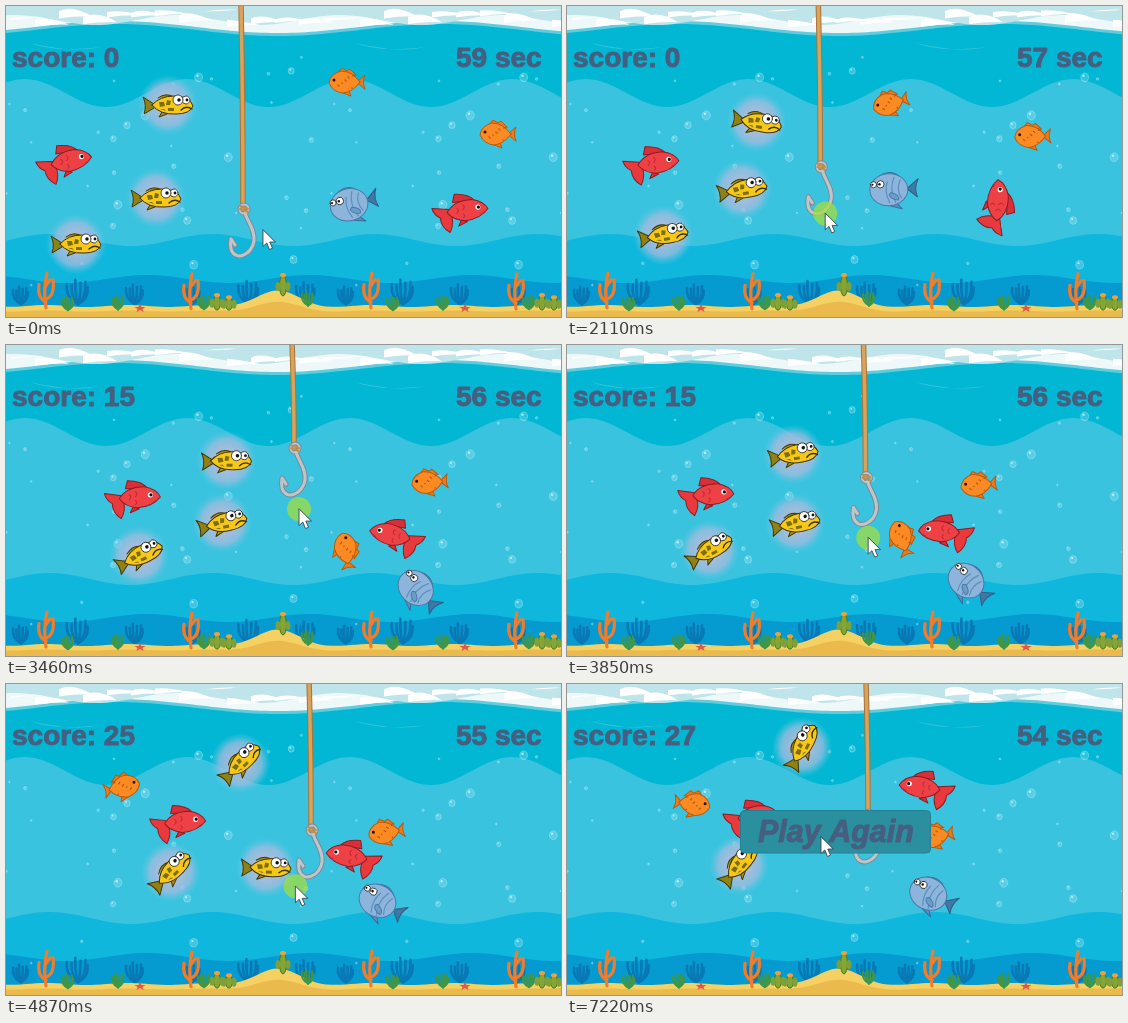
An HTML page with a canvas that plays this animation: 555x311 px, repeating every 7.31 s.

```html
<!DOCTYPE html>
<html>
<head>
<meta charset="utf-8">
<style>
html, body { margin: 0; width: 100%; height: 100%; overflow: hidden; }
canvas { display: block; }
</style>
</head>
<body>
<canvas id="stage" width="555" height="311"></canvas>
<script>
const W = 555, H = 311, LOOP = 7310, TILE = 325;
const START = 1270, GAME_OVER = 5250, HOVER = 5980, PRESS = 7140;
const INK = '#465f80';
const scenery = document.createElement('canvas');
scenery.width = W;
scenery.height = H;
let g = scenery.getContext('2d');

let seed = 7;
function random(low, high) {
  seed = seed * 16807 % 2147483647;
  return low + (high - low) * seed / 2147483647;
}
const clamp = p => Math.max(0, Math.min(1, p));
const mix = (a, b, p) => a + (b - a) * p;

function shape(d, fill, stroke, width = 1) {
  const path = new Path2D(d);
  if (fill) { g.fillStyle = fill; g.fill(path); }
  if (stroke) {
    g.strokeStyle = stroke;
    g.lineWidth = width;
    g.lineCap = g.lineJoin = 'round';
    g.stroke(path);
  }
}

function oval(x, y, rx, ry, fill, stroke, width = 1) {
  g.beginPath();
  g.ellipse(x, y, rx, ry, 0, 0, 7);
  if (fill) { g.fillStyle = fill; g.fill(); }
  if (stroke) { g.strokeStyle = stroke; g.lineWidth = width; g.stroke(); }
}

// ---- scenery: a tile that repeats every 325 px ----

const turn = x => x * 2 * Math.PI / TILE;
// Edge with a number of crests per tile, lowest on screen at x = trough.
const swell = (base, height, crests, trough) =>
  x => base + height * Math.cos(crests * turn(x - trough));
const dunes = x => 300 + Math.cos(turn(4 * x)) - 15 * Math.max(0, Math.cos(turn(x - 270))) ** 6;

// Fills everything below the edge, or above it if up.
function layer(edge, fill, up) {
  let d = `M0 ${up ? 0 : H}`;
  for (let x = 0; x <= W + 5; x += 5) d += `L${x} ${edge(x)}`;
  shape(`${d}V${up ? 0 : H}Z`, fill);
}

// Fan of curved stalks growing from one base.
function plant(x, y, height, stalks, color, width = 2) {
  for (let i = 0; i < stalks; i++) {
    const a = 1.4 * i / (stalks - 1) - .7;
    const h = height * (1 - .3 * Math.abs(a) - .12 * (i % 2));
    shape(`M${x} ${y}q${h * a * .9} ${-h * .3} ${h * a * .8} ${-h}`, null, color, width);
  }
}

function coral(x, height) {
  const y = dunes(x) + 3;
  shape(`M${x} ${y}q-3 ${-height / 2} 1 ${-height}M${x} ${y - 6}q-9 -4 -7 ${-height * .5}` +
        `M${x} ${y - 9}q9 -3 7 ${-height * .55}M${x - 1} ${y - height * .6}l5 -7`, null, '#f07c2c', 3.2);
}

function cactus(x, height) {
  const y = dunes(x) + 5;
  oval(x, y - height / 2, 3.5, height / 2, '#86a535', '#47791f');
  for (const side of [-5, 5]) oval(x + side, y - height * .45, 2.5, 4.5, '#7da03a');
  oval(x, y - height, 3, 2, '#f0a03a');
}

function reef() {
  for (let x = 15; x < TILE; x += 57) plant(x, 298, random(18, 26), 6, '#0879b5', 2.6);
}

function seabed() {
  coral(40, 35);
  coral(185, 35);
  for (const x of [62, 112, 198, 302]) plant(x, dunes(x) + 4, 14, 6, '#3f9648');
  cactus(211, 15);
  cactus(223, 13);
  cactus(277, 21);
  shape('M134 298l1.500 3 4 0-3 2 1 3-3.500-2-3.500 2 1-3-3-2 4 0z', '#e2574a');
}

function bubbles() {
  for (let i = 0; i < 34; i++) {
    const x = random(0, TILE), y = random(38, 280), r = .8 + 4 * random(0, 1) ** 3;
    oval(x, y, r, r * 1.1, 'rgba(190,240,250,.25)', 'rgba(200,243,252,.5)', .7);
    oval(x - r * .3, y - r * .4, r * .3, r * .3, 'rgba(255,255,255,.6)');
  }
}

function foam() {
  for (let x = 5; x < TILE; x += 24) {
    const y = random(4, 15);
    shape(`M${x} ${y}q${random(8, 16)} ${random(-7, 1)} 34 ${random(-2, 6)}q-14 -1 -34 2z`, '#fff');
  }
}

function tiled(draw) {
  const start = seed;
  for (let x = 0; x < W; x += TILE) {
    seed = start;
    g.save();
    g.translate(x, 0);
    draw();
    g.restore();
  }
}

function paintScenery() {
  g.fillStyle = '#02b7d3';
  g.fillRect(0, 0, W, H);
  tiled(() => shape('M22 36Q45 47 95 41Q72 46 45 41Q30 39 22 36Z', '#35c6dc'));
  layer(swell(87, 14, 2, 100), '#39c3df');
  layer(swell(234, 6, 2, 125), '#10b7dd');
  layer(swell(273, 4, 2, 60), '#069bd0');
  tiled(reef);
  tiled(bubbles);
  layer(dunes, '#f5d163');
  layer(x => dunes(x) * .6 + 125, '#eabb4c');
  tiled(seabed);
  layer(swell(24, 6, 1, 272), '#62cbdc', true);
  layer(swell(21, 6, 1, 272), '#eef8f9', true);
  layer(swell(14, 5, 2, 90), '#bfe4e9', true);
  tiled(foam);
}

// ---- fish, drawn facing right around their centre ----

function eye(x, y, r) {
  oval(x, y, r, r, '#fff', '#222', .8);
  oval(x + 1, y, r * .35, r * .35, '#111');
}

const art = {
  yellow() {
    const light = g.createRadialGradient(0, 0, 4, 0, 0, 30);
    light.addColorStop(0, 'rgba(205,188,218,.9)');
    light.addColorStop(.65, 'rgba(160,188,222,.75)');
    light.addColorStop(1, 'rgba(100,200,226,0)');
    oval(0, 0, 30, 30, light);
    shape('M-14-1L-25-8Q-21 0-24 9L-14 3Z', '#8f8212', '#3d3808');
    shape('M-10-7Q-2-13 6-8M-6 7l-3 5 8-3', '#a5901a', '#3d3808');
    shape('M-16 0Q-8-9 6-9Q22-9 25 1Q22 9 8 9Q-8 10-16 0Z', '#f7c916', '#3d3208');
    shape('M-9-3l5 0 1 4-5 1ZM-1-5l4 1-1 4-4 0ZM0 3l6 0 0 3-6 0ZM-8 4l4 0 2 2z', '#7d6d10');
    eye(18, -5, 4);
    eye(10, -5, 5);
    shape('M13 5Q18 0 24 4', null, '#3d3208', 1.4);
  },
  red() {
    const edge = '#8c1c24';
    shape('M-11-2L-28-4Q-26 3-20 6Q-20 15-11 21Q-6 12-9 3Z', '#e8393c', edge);
    shape('M-7-9L-5-17Q9-17 15-10ZM1 9l-3 6 9-4z', '#d92f37', edge);
    shape('M-13 1Q-6-11 12-11Q24-9 28-1Q20 9 5 10Q-7 9-13 1Z', '#ee4145', edge);
    shape('M-3-3q3 2 0 5M3-6q3 2 0 5M3 3q3 2 0 4M21 4l4-2', null, '#bd2934');
    oval(18, -3, 2.6, 2.6, '#fff');
    oval(18.6, -3, 1.6, 1.6, '#111');
  },
  blue() {
    shape('M-15 0L-27-9Q-22 0-25 9Z', '#3f78a4', '#2f5f88');
    shape('M-9-12Q0-21 12-14ZM-4 14l-5 6 12-4z', '#5b8fbe', '#3a6c98');
    oval(3, 0, 19, 16, '#8db5db', '#4a7ba8');
    shape('M-9-9q5 9 0 18M-3-12q6 12 0 25M4-8q4 10-1 21', null, '#5d8fbd', 1.2);
    shape('M1 3q-9 3-7 8q8-1 9-6z', '#6b9dcb', '#4a7ba8');
    eye(18, -6, 3);
    eye(11, -6, 3.6);
  },
  orange() {
    const edge = '#b95b0e';
    shape('M-10 0L-18-7Q-15 0-18 7Z', '#ee7a1b', edge);
    shape('M-9-7L-3-13 0-11 5-14 10-8ZM-2 9l-2 5 8-3z', '#ee7a1b', edge);
    shape('M-13 0Q-5-11 6-11Q17-8 18 1Q14 10 4 11Q-6 10-13 0Z', '#fb8a22', edge);
    for (let i = 0; i < 9; i++) oval(-6 + i * 7 % 17, -6 + i * 5 % 13, .7, .7, '#ae4d0d');
    oval(13, -2, 1.5, 1.5, '#301505');
  }
};

// ---- motion ----

// A swim passes through [x, y, heading] at its start, halfway (optional) and end.
// A caught fish scores and leaves; its next swim starts somewhere else.
const caught = (until, points, ...path) => ({ until, points, path });
const free = (...path) => ({ until: GAME_OVER, path });

const school = [
  ['yellow', free([162, 99, 0], [217, 118, 3], [235, 63, -62])],
  ['yellow', caught(GAME_OVER, 0, [150, 192, 0], [210, 178, -13], [272, 187, 8])],
  ['yellow', free([70, 238, 0], [128, 214, -23], [172, 181, -50])],
  ['red', free([58, 156, -8], [120, 154, 0], [184, 133, -2])],
  ['red', caught(5060, 2, [454, 205, -3], [400, 194, -160], [342, 170, -168]),
    free([366, 106, -176], [360, 104, -176])],
  ['orange', caught(3080, 10, [341, 76, 180], [304, 122, 145]),
    caught(3900, 10, [345, 218, -90], [334, 192, -110]),
    free([88, 106, -35], [108, 97, -25], [125, 120, 8])],
  ['orange', free([492, 128, 180], [430, 136, 176], [369, 152, 170])],
  ['blue', caught(2780, 5, [346, 198, 165], [308, 172, 185]),
    free([430, 258, 232], [364, 211, 205])]
];

function along(path, p) {
  const a = path[0], b = path[path.length - 1];
  const middle = path.length > 2 ? path[1] : a.map((v, i) => (v + b[i]) / 2);
  return a.map((v, i) => mix(v, b[i], p) + 4 * p * (1 - p) * (middle[i] - (v + b[i]) / 2));
}

// Key points are [time, x, y].
const hookPath = [[START, 238, 203], [1570, 242, 178], [2670, 267, 143],
  [3460, 289, 103], [4320, 312, 168], [GAME_OVER, 302, 131]];
const pointerPath = [[0, 257, 224], [240, 250, 226], [1570, 242, 231], [2670, 275, 183],
  [3460, 293, 164], [4320, 311, 227], [5570, 262, 171], [6300, 255, 168], [6600, 254, 153]];

function at(keys, t) {
  const next = keys.findIndex(k => k[0] > t);
  if (next < 1) return keys[next ? keys.length - 1 : 0].slice(1);
  const a = keys[next - 1], b = keys[next], p = (t - a[0]) / (b[0] - a[0]);
  return [mix(a[1], b[1], p), mix(a[2], b[2], p)];
}

function label(text, x, y, font) {
  g.font = font + ' "Liberation Sans", sans-serif';
  g.fillStyle = g.strokeStyle = INK;
  g.lineWidth = 1;
  g.lineJoin = 'round';
  g.fillText(text, x, y);
  g.strokeText(text, x, y);
}

function drawFish(kind, swims, t) {
  const i = swims.findIndex(s => t < s.until || s.points === undefined);
  if (i < 0) return;
  const begin = i ? swims[i - 1].until : START;
  const p = clamp((t - begin) / (swims[i].until - begin));
  const [x, y, heading] = along(swims[i].path, p), angle = heading * Math.PI / 180;
  g.save();
  g.translate(x, y);
  g.rotate(angle);
  if (Math.cos(angle) < 0) g.scale(1, -1);
  art[kind]();
  g.restore();
}

function drawHook(t) {
  const [x, y] = at(hookPath, t);
  const rope = `M${x - 3} -3Q${x - 1} ${y / 2} ${x - 1} ${y}`;
  shape(rope, null, '#a8733a', 5.5);
  shape(rope, null, '#d9a35c', 3.5);
  g.save();
  g.translate(x, y);
  for (const [color, width] of [['#7e8b94', 5], ['#bcc6cb', 3]]) {
    oval(0, 0, 4.5, 4.5, null, color, width - 1);
    shape('M1 4C4 14 11 20 10 32C8 46-9 53-13 40Q-14 35-13 30L-9 36', null, color, width);
  }
  shape('M-4-3L4 0M-4 0L4 3', null, '#c48f4d', 2);
  g.restore();
}

function drawButton(t) {
  const hover = .8 * clamp((t - HOVER + 80) / 160) + .2 * clamp((t - PRESS + 80) / 160);
  g.beginPath();
  g.roundRect(173.5, 126.5, 190, 42.5, 4);
  g.fillStyle = `rgb(${mix(40, 42, hover)},${mix(177, 143, hover)},${mix(199, 158, hover)})`;
  g.fill();
  g.strokeStyle = '#267f91';
  g.lineWidth = 1;
  g.stroke();
  label('Play Again', 191, 158, 'italic bold 30.5px');
}

function drawPointer(t) {
  const [x, y] = at(pointerPath, t);
  if (t >= 790 && t < HOVER) oval(x, y, 12, 12, 'rgba(165,222,60,.72)');
  g.save();
  g.translate(x, y);
  shape('M0 0V16.5L3.8 13L6.5 19.5L9.5 18.2L6.800 12H12Z', '#fff', '#3c4650', .9);
  g.restore();
}

function frame() {
  const t = performance.now() % LOOP;
  const seconds = 59 - Math.min(5, Math.floor((t + 100) / 1000));
  const score = school.flat().reduce((sum, s) => sum + (t >= s.until && s.points || 0), 0);
  g.drawImage(scenery, 0, 0);
  label('score: ' + score, 6, 61, 'bold 28px');
  label(seconds + ' sec', 450, 61, 'bold 28px');
  for (const [kind, ...swims] of school) drawFish(kind, swims, t);
  drawHook(t);
  if (t >= GAME_OVER) drawButton(t);
  drawPointer(t);
  requestAnimationFrame(frame);
}

paintScenery();
g = document.getElementById('stage').getContext('2d');
frame();
</script>
</body>
</html>
```
